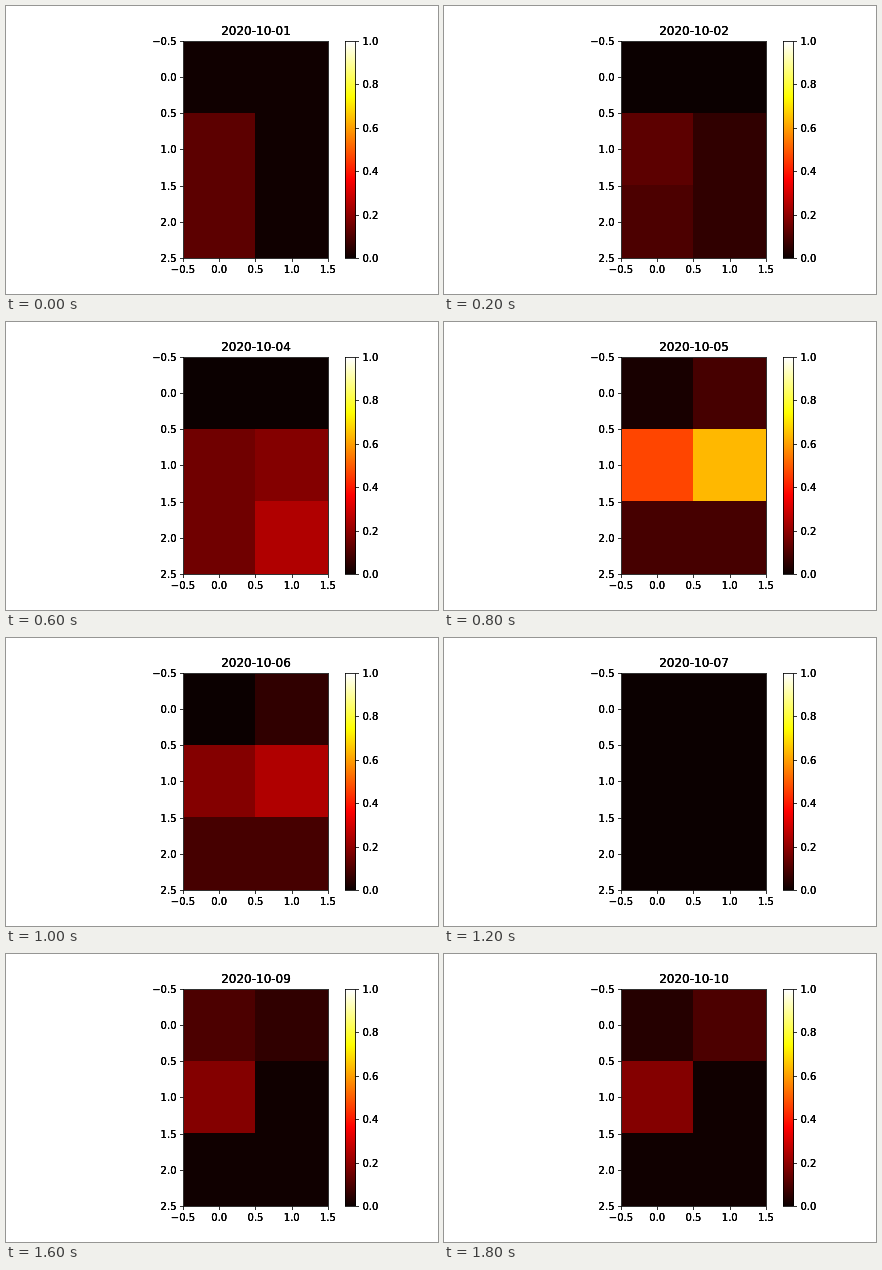
Recreate the animation shown at these times as an HTML page with a canvas. Size 432 by 288 pixels, loop 2800 ms.

```html
<!DOCTYPE html>
<html lang="en">
<head>
<meta charset="utf-8">
<title>Daily heatmap</title>
<style>
  html, body { margin: 0; width: 100%; height: 100%; overflow: hidden; background: #fff; }
  canvas { display: block; }
</style>
</head>
<body>
<canvas id="stage" width="432" height="288"></canvas>
<script>
const ctx = document.getElementById('stage').getContext('2d');
const STEP = 200, LOOP = 2800;
const LEFT = 177.5, RIGHT = 322.5, TOP = 35.5, BOTTOM = 252.5;
const COLS = [178, 249, 322], ROWS = [36, 107, 179, 252];

// One string per day: six cell colours, row by row
const DAYS = [
  '100000 100000 5c0000 100000 5c0000 100000',
  '0b0000 0b0000 5c0000 300000 4c0000 300000',
  '0a0000 0a0000 600000 4c0000 4c0000 4c0000',
  '0b0000 0b0000 700000 840000 700000 b00000',
  '180000 460000 ff4500 ffb800 460000 460000',
  '0b0000 300000 840000 b00000 460000 460000',
  '0b0000 0b0000 0b0000 0b0000 0b0000 0b0000',
  '640000 300000 ff4c00 840000 400000 300000',
  '4c0000 300000 840000 100000 100000 100000',
  '250000 4c0000 840000 100000 100000 100000'
].map(day => day.split(' ').map(c => '#' + c));

const unit = x => Math.min(1, Math.max(0, x));

function hot(v) {
  const r = 0.0416 + 0.9584 * unit(v / 0.365);
  const g = unit((v - 0.365) / 0.381);
  const b = unit((v - 0.746) / 0.254);
  return `rgb(${[r, g, b].map(c => Math.round(c * 255))})`;
}

function label(text, x, y, align, size = 10) {
  ctx.font = `${size}px "DejaVu Sans", sans-serif`;
  ctx.textAlign = align;
  ctx.fillStyle = '#000';
  // Repeated passes give the dense, hard-edged lettering
  for (let i = 0; i < 3; i++) ctx.fillText(text, x, y);
}

function tick(x, y, dx, dy) {
  ctx.beginPath();
  ctx.moveTo(x, y);
  ctx.lineTo(x + dx, y + dy);
  ctx.stroke();
}

const snap = v => Math.round(v) + 0.5;
const number = v => v.toFixed(1).replace('-', '\u2212');

function drawAxes() {
  ctx.strokeStyle = '#000';
  ctx.lineWidth = 0.8;
  ctx.strokeRect(LEFT, TOP, RIGHT - LEFT, BOTTOM - TOP);
  for (let i = 0; i <= 6; i++) {
    const y = 34.56 + i * 36.24;
    tick(LEFT, snap(y), -3.5, 0);
    label(number(i / 2 - 0.5), 170.5, Math.round(y + 4), 'right');
  }
  for (let i = 0; i <= 4; i++) {
    const x = 177.5 + i * 36.24;
    tick(snap(x - 0.5), BOTTOM, 0, 3.5);
    label(number(i / 2 - 0.5), x - 0.5, 267, 'center');
  }
}

function drawBar() {
  for (let y = 35; y < 252; y++) {
    ctx.fillStyle = hot((251.5 - y) / 216);
    ctx.fillRect(339, y, 11, 1);
  }
  ctx.strokeStyle = '#000';
  ctx.lineWidth = 0.8;
  ctx.strokeRect(339.5, TOP, 10, BOTTOM - TOP);
  for (let i = 0; i <= 5; i++) {
    const y = 252 - i * 43.488;
    tick(349.5, snap(y), 3.5, 0);
    label(number(i / 5), 356.5, Math.round(y + 4), 'left');
  }
}

function draw(day) {
  ctx.fillStyle = '#fff';
  ctx.fillRect(0, 0, 432, 288);
  DAYS[day].forEach((color, i) => {
    const c = i % 2, r = i >> 1;
    ctx.fillStyle = color;
    ctx.fillRect(COLS[c], ROWS[r], COLS[c + 1] - COLS[c], ROWS[r + 1] - ROWS[r]);
  });
  drawAxes();
  drawBar();
  label('2020-10-' + String(day + 1).padStart(2, '0'), 250, 29, 'center', 12);
}

let shown = -1;
function frame() {
  const t = performance.now() % LOOP;
  const day = Math.min(DAYS.length - 1, Math.floor(t / STEP));
  if (day !== shown) draw(shown = day);
  requestAnimationFrame(frame);
}
frame();
</script>
</body>
</html>
```
